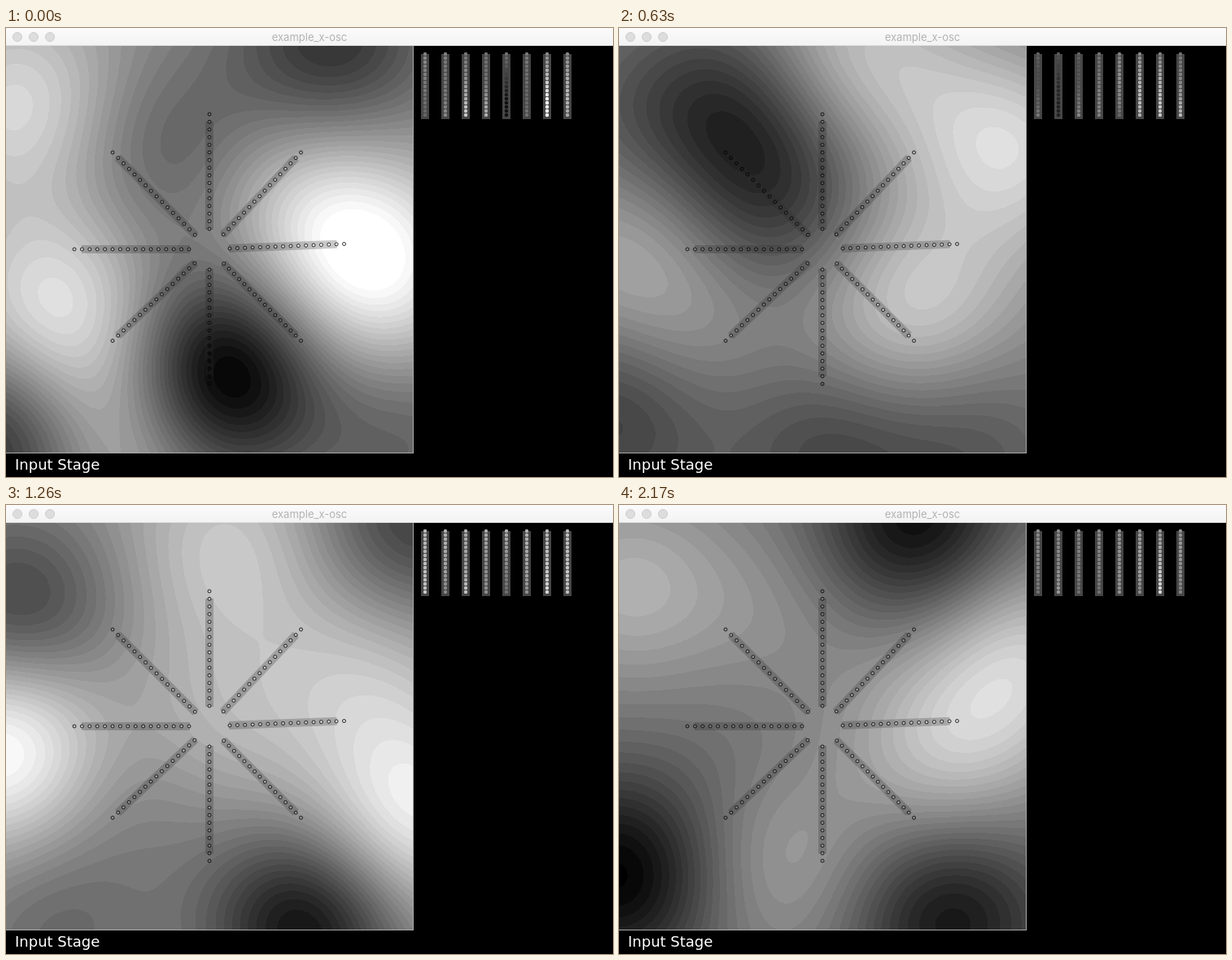
Animation, 746 px wide and 552 px high, one loop 2.24 s. Source, as an HTML page with a canvas:

```html
<!DOCTYPE html>
<html lang="en">
<head>
<meta charset="utf-8">
<title>Input Stage</title>
<style>
  html, body { margin: 0; width: 746px; height: 552px; overflow: hidden; background: #000; }
  canvas { position: absolute; left: 0; top: 0; }
  .bar {
    position: absolute; left: 0; top: 0; width: 746px; height: 22px; box-sizing: border-box;
    background: linear-gradient(#fbfbfb, #f3f3f3); border-bottom: 1px solid #dcdcdc;
    font: 13px/23px Inter, Roboto, sans-serif; color: #b2b2b2; text-align: center;
  }
  .bar i {
    position: absolute; top: 5px; width: 12px; height: 12px; box-sizing: border-box;
    border-radius: 50%; background: #dddddd; border: 1px solid #cecece;
  }
  .label {
    position: absolute; left: 11px; top: 524px; white-space: nowrap;
    font: 18px/26px "DejaVu Sans", "Noto Sans", sans-serif; color: #fff;
  }
</style>
</head>
<body>
<canvas id="stage" width="746" height="552"></canvas>
<div class="bar"><i style="left:8px"></i><i style="left:28px"></i><i style="left:48px"></i>example_x-osc</div>
<div class="label">Input Stage</div>
<script>
const ctx = document.getElementById('stage').getContext('2d');
const SIZE = 500, TOP = 22, CELL = 5, GRID = SIZE / CELL + 1;
const STEP = 70, LOOP = 2240, DOTS = 16, REACH = 125;

const lerp = (a, b, k) => a + (b - a) * k;
const bell = (dx, dy) => Math.exp(-(dx * dx + dy * dy) / (REACH * REACH));

// Weights that make a sum of bells pass through the key points (Gaussian elimination).
function solveWeights(points, base) {
  const rows = points.map(([x, y, grey], i) => [
    ...points.map(([px, py], j) => bell(x - px, y - py) + (i === j ? .02 : 0)),
    grey - base
  ]);
  const size = rows.length;
  for (let i = 0; i < size; i++) {
    for (let j = 0; j < size; j++) {
      if (j === i) continue;
      const f = rows[j][i] / rows[i][i];
      rows[j] = rows[j].map((v, k) => v - f * rows[i][k]);
    }
  }
  return rows.map((row, i) => row[size] / row[i]);
}

// A smooth field through a few hills and hollows, each [x, y, grey].
const poses = [];
function pose(time, ...points) {
  const base = points.reduce((sum, p) => sum + p[2], 0) / points.length;
  const weights = solveWeights(points, base);
  const field = Float32Array.from({ length: GRID * GRID }, (_, n) => {
    const x = n % GRID * CELL, y = Math.floor(n / GRID) * CELL + TOP;
    return points.reduce((sum, p, i) => sum + weights[i] * bell(x - p[0], y - p[1]), base);
  });
  poses.push({ time, field });
}

pose(0, [20, 95, 216], [62, 345, 224], [375, 215, 232], [450, 300, 268], [265, 425, 4],
  [400, 22, 50], [195, 150, 106], [0, 505, 64], [490, 500, 100], [130, 490, 160]);
pose(420, [150, 95, 8], [485, 120, 260], [370, 60, 215], [65, 360, 184], [385, 310, 178],
  [430, 510, 48], [250, 515, 58], [0, 500, 80], [0, 50, 150], [170, 210, 75]);
pose(910, [15, 85, 2], [265, 30, 250], [195, 215, 8], [345, 355, 244], [0, 265, 170],
  [0, 435, 35], [490, 170, 194], [490, 25, 90], [270, 515, 92], [490, 400, 165]);
pose(1260, [15, 130, 80], [275, 55, 202], [500, 22, 66], [0, 295, 252], [495, 385, 236],
  [440, 210, 205], [370, 515, 20], [60, 520, 105], [150, 340, 150], [250, 272, 180]);
pose(1610, [0, 40, 240], [88, 215, 80], [330, 22, 64], [500, 60, 56], [300, 210, 245],
  [430, 210, 260], [140, 465, 232], [385, 515, 72], [490, 330, 195]);
pose(1890, [0, 50, 232], [130, 225, 0], [335, 22, 20], [460, 215, 186], [155, 505, 212],
  [400, 485, 24], [0, 380, 78], [270, 360, 130]);
pose(2170, [10, 100, 178], [365, 22, 14], [400, 300, 205], [495, 185, 212], [0, 455, 0],
  [405, 505, 24], [200, 440, 148], [150, 310, 118], [200, 130, 140]);

const grid = new Float32Array(GRID * GRID);
function setGrid(time) {
  const next = Math.max(1, poses.findIndex(p => p.time >= time));
  const a = poses[next - 1], b = poses[next];
  const k = (time - a.time) / (b.time - a.time);
  for (let n = 0; n < grid.length; n++) grid[n] = lerp(a.field[n], b.field[n], k);
}

// Grey level at a field pixel, rounded to visible bands.
function level(x, y) {
  const gx = x / CELL, gy = y / CELL;
  const col = Math.floor(gx), row = Math.floor(gy);
  const n = row * GRID + col;
  const upper = lerp(grid[n], grid[n + 1], gx - col);
  const lower = lerp(grid[n + GRID], grid[n + GRID + 1], gx - col);
  return Math.max(0, Math.min(255, Math.round(lerp(upper, lower, gy - row) / 8) * 8));
}

const image = ctx.createImageData(SIZE, SIZE);
const pixels = new Uint32Array(image.data.buffer);

function drawField() {
  for (let y = 0, n = 0; y < SIZE; y++) {
    for (let x = 0; x < SIZE; x++) pixels[n++] = 0xff000000 | level(x, y) * 0x10101;
  }
  ctx.putImageData(image, 0, TOP);
  ctx.fillStyle = '#aaa';
  ctx.fillRect(500, TOP, 1, 501);
  ctx.fillRect(0, 522, 501, 1);
}

function dot(x, y, radius, grey) {
  ctx.beginPath();
  ctx.arc(x, y, radius, 0, 7);
  ctx.fillStyle = `rgb(${grey},${grey},${grey})`;
  ctx.fill();
}

// Outer ends of the spokes, relative to the hub, from the top anticlockwise.
const HUB = [250, 272];
const spokes = [[0, -166], [-119, -119], [-166, 0], [-119, 112.5],
  [0, 165.5], [112.5, 112.5], [165.5, -6.5], [112.5, -119]];

function drawSpoke([ex, ey], index) {
  const length = Math.hypot(ex, ey), first = 25 / length;
  const at = k => [HUB[0] + ex * k, HUB[1] + ey * k];
  ctx.beginPath();
  ctx.moveTo(...at(first - 1 / length));
  ctx.lineTo(...at(1 - 9 / length));
  ctx.lineWidth = 10;
  ctx.strokeStyle = 'rgba(40,40,40,.25)';
  ctx.stroke();

  const left = 510 + index * 25;
  ctx.fillStyle = '#464646';
  ctx.fillRect(left, 32, 10, 80);
  ctx.lineWidth = 1;
  ctx.strokeStyle = 'rgba(0,0,0,.8)';
  for (let i = 0; i < DOTS; i++) {
    const [x, y] = at(lerp(first, 1, i / (DOTS - 1)));
    const grey = level(x, y - TOP);
    dot(x, y, 2, grey);
    ctx.stroke();
    dot(left + 5, 32 + i * 5, 2.2, grey);
  }
}

function draw(time) {
  ctx.fillStyle = '#000';
  ctx.fillRect(0, 0, 746, 552);
  setGrid(time);
  drawField();
  spokes.forEach(drawSpoke);
}

let shown = -1;
function tick() {
  const time = Math.floor(performance.now() % LOOP / STEP) * STEP;
  if (time !== shown) draw(shown = time);
  requestAnimationFrame(tick);
}
tick();
</script>
</body>
</html>
```
